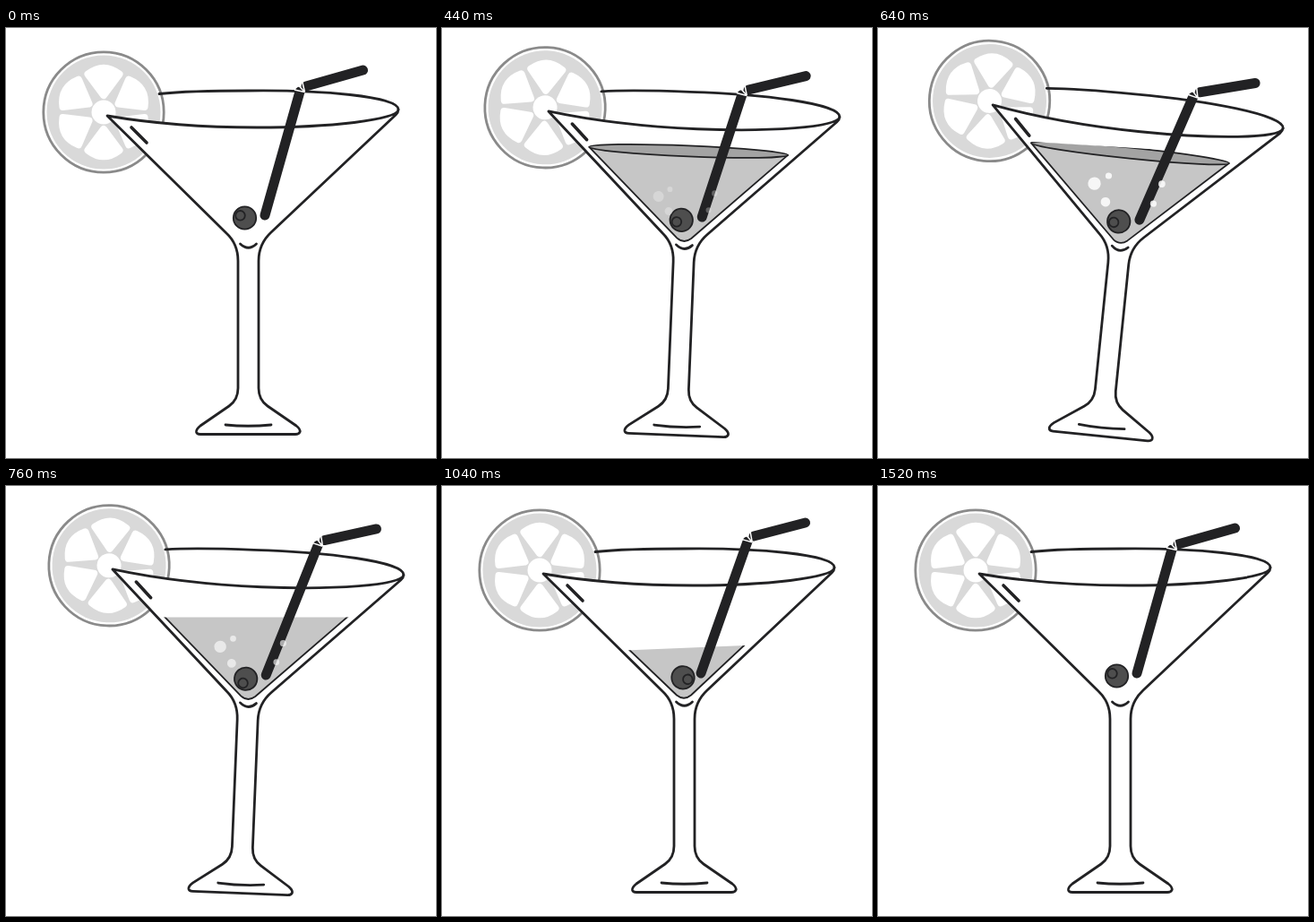
Write an HTML page that moves like this. It is 480 by 480 pixels and loops after 3 s.

```html
<!DOCTYPE html>
<html lang="en">
<head>
<meta charset="utf-8">
<title>Cocktail</title>
<style>
html, body { margin: 0; width: 100%; height: 100%; overflow: hidden; background: #fff; }
svg { display: block; width: 100%; height: 100%; }
.ink { fill: none; stroke: #222224; stroke-width: 2.8; stroke-linecap: round; stroke-linejoin: round; }
.bold { stroke-width: 3.6; }
.edge { stroke: #222224; stroke-width: 1.8; stroke-linejoin: round; }
.tube { stroke: #222224; stroke-width: 11; stroke-linecap: round; }
</style>
</head>
<body>
<svg viewBox="0 0 480 480">
  <defs>
    <clipPath id="level">
      <path id="cut" d="M70 8.2L470 -8.2V400H70Z"/>
    </clipPath>
  </defs>
  <g id="drink">
    <g id="lemon" transform="translate(109 94)">
      <circle r="67.2" fill="#fff" stroke="#8a8a8a" stroke-width="2.8"/>
      <circle r="63.5" fill="#d9d9d9"/>
      <circle r="13.5" fill="#fff"/>
    </g>
    <path class="ink" d="M171 73.5C190 71.5 230 70 270 70C350 69 438 76 438 91"/>
    <path class="ink" style="fill:#fff" d="M113 98C160 106 220 111 280 111C360 111 437 103 438 91Q438 94 435 97
      L296 228Q282 241 282 260V402Q282 415 292 422L324 444Q329 448 328 451Q327 453.500 323 453.500H217
      Q213 453.500 212.500 451Q212 448 217 444L249 422Q259 415 259 402V260Q259 241 246 229Z"/>
    <path class="ink" d="M245 443Q270 445.500 296 443"/>
    <path class="ink" d="M261.500 241Q270.500 249.500 279.500 241"/>
    <path class="ink bold" d="M140 111L157 128"/>
    <g id="liquid" clip-path="url(#level)">
      <path class="edge" fill="#c6c6c6" d="M160 136L262 233.500Q270 240 278 233.500L382 136Z"/>
      <ellipse class="edge" cx="271" cy="136" rx="111" ry="6" fill="#a3a3a3"/>
    </g>
    <g id="olive" fill="#4e4e4e" class="edge">
      <circle cx="266.500" cy="212" r="12.700"/>
      <circle cx="261.500" cy="209.300" r="5.300"/>
    </g>
    <line id="stem" class="tube" x1="289" y1="209"/>
    <line id="spout" class="tube"/>
    <path id="joint" fill="none" stroke="#fff" stroke-width="1.5" d="M4.500 4.500L-7 2M4.500 4.500L-4 -4.500M4.500 4.500L1.500 -8"/>
    <g id="bubbles" fill="#fff"></g>
  </g>
</svg>
<script>
const LOOP = 3000, STEP = 40;
const $ = id => document.getElementById(id);
const set = (el, attrs) => { for (const k in attrs) el.setAttribute(k, attrs[k]); };
const add = (parent, tag, attrs) => {
  const el = document.createElementNS("http://www.w3.org/2000/svg", tag);
  set(el, attrs);
  parent.append(el);
};

const petal = "M19 0L42.5 -17.5Q56 0 42.5 17.5Z";
for (let a = 30; a < 390; a += 60)
  add($("lemon"), "path", { d: petal, transform: `rotate(${a})`, fill: "#fff",
    stroke: "#fff", "stroke-width": 8, "stroke-linejoin": "round" });

// x, y, radius
[[239.5, 188, 6], [252, 179.5, 3], [251.5, 204, 4.4], [302, 182, 3.2], [296, 201, 3]]
  .forEach(([cx, cy, r]) => add($("bubbles"), "circle", { cx, cy, r }));

// tracks of [time, value], linear between the points
const tracks = {
  tilt: [[360, 0], [600, 7], [840, 0]],
  level: [[0, 241.5], [408, 125], [600, 125], [1520, 241.5]],
  spin: [[0, 0], [470, 330], [600, 330], [1520, 0]],
  pull: [[560, 0], [720, 1], [1120, 1], [1320, 0]],
  fizz: [[340, 0], [660, 1], [980, 0]]
};

function at(track, t) {
  const i = track.findIndex(p => p[0] > t);
  if (i < 0) return track[track.length - 1][1];
  if (i === 0) return track[0][1];
  const [t0, v0] = track[i - 1], [t1, v1] = track[i];
  return v0 + (v1 - v0) * (t - t0) / (t1 - t0);
}

function draw(t) {
  const v = {};
  for (const k in tracks) v[k] = at(tracks[k], t);

  set($("drink"), { transform: `rotate(${v.tilt} 240 240)` });
  set($("cut"), { transform: `translate(0 ${v.level})` });
  set($("liquid"), { visibility: v.level > 241 ? "hidden" : "visible" });
  set($("olive"), { transform: `rotate(${v.spin} 267.7 213)` });

  const x = 329 + 13 * v.pull, y = 67 - 9 * v.pull;
  set($("stem"), { x2: x - 1, y2: y + 4 });
  set($("spout"), { x1: x + 6, y1: y - 2, x2: 398.5 + 7 * v.pull, y2: 47 - 6 * v.pull });
  set($("joint"), { transform: `translate(${x} ${y}) rotate(${3 * v.pull})` });

  set($("bubbles"), { opacity: 0.9 * v.fizz,
    transform: `translate(263 259) scale(${0.9 + 0.32 * v.fizz}) translate(-263 -259)` });
}

const start = performance.now();
function tick() {
  const t = (performance.now() - start) % LOOP;
  draw(Math.floor(t / STEP) * STEP);
  requestAnimationFrame(tick);
}
draw(0);
requestAnimationFrame(tick);
</script>
</body>
</html>
```
